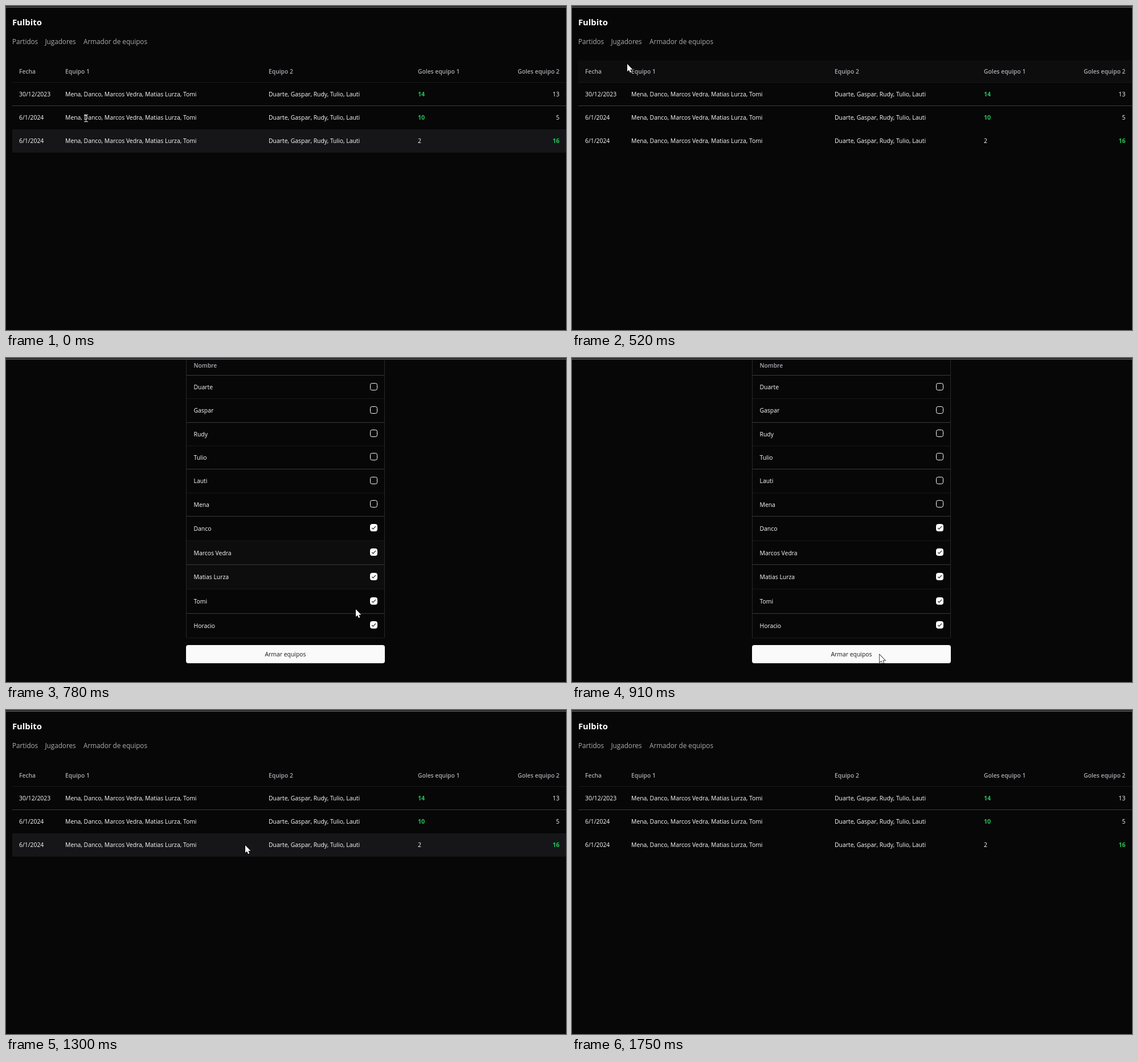
An HTML page with a canvas that plays this animation: 983 px wide and 570 px high, repeating every 1810 ms.

```html
<!DOCTYPE html>
<html lang="es">
<head>
<meta charset="utf-8">
<title>Fulbito</title>
<style>
  html, body { margin: 0; width: 100%; height: 100%; overflow: hidden; background: #070707; }
  canvas { display: block; }
</style>
</head>
<body>
<canvas id="stage" width="983" height="570"></canvas>
<script>
const ctx = document.getElementById('stage').getContext('2d');
const LOOP = 1810, STEP = 130, LAST_STEP = 1750;
const BG = '#070707', WHITE = '#ffffff', MUTED = '#acacb3', GREEN = '#22c55e';
const LINE = '#3a3a3d', FAINT = '#19191b';
const FAMILY = '"Open Sans", "Noto Sans", sans-serif';
const BODY = `500 10.4px ${FAMILY}`, HEAD = `600 10.3px ${FAMILY}`;
const STRONG = `700 10.6px ${FAMILY}`, NAV = `500 11.7px ${FAMILY}`, TITLE = `700 14.8px ${FAMILY}`;

const team1 = ['Mena', 'Danco', 'Marcos Vedra', 'Matias Lurza', 'Tomi'];
const team2 = ['Duarte', 'Gaspar', 'Rudy', 'Tulio', 'Lauti'];
const players = [...team2, ...team1, 'Horacio'];
const matches = [['30/12/2023', 14, 13], ['6/1/2024', 10, 5], ['6/1/2024', 2, 16]];

// Each pose holds for one step; "lit" maps a row (0 = table header) to its hover strength.
const poses = [
  { at: [141, 197], beam: true, lit: { 3: 1 } },
  { at: [133, 188], lit: { 2: 1 } },
  { at: [125, 178], lit: { 1: 1 } },
  { at: [111, 141], lit: { 1: 1 } },
  { at: [97, 102], lit: { 0: 0.4 } },
  { list: true, at: [645, 386], top: 38, checked: [6, 8], lit: { 8: 0.6 } },
  { list: true, at: [614, 442], top: 30.5, checked: [6, 10], lit: { 7: 0.35, 8: 0.35 } },
  { list: true, at: [540, 522], top: 30.5, checked: [6, 10], lit: {} },
  { at: [176, 232], lit: { 3: 1 } },
  { at: [232, 183], lit: { 2: 0.6, 3: 0.6 } },
  { at: [420, 238], lit: { 3: 1 } },
  { at: [620, 301], lit: { 3: 0.3 } },
  { at: [811, 161], lit: { 1: 0.85 } },
  { at: [964, 142], lit: { 1: 0.85 } },
  { lit: {} }
];

function rect(x, y, w, h, color) {
  ctx.fillStyle = color;
  ctx.fillRect(x, y, w, h);
}

function text(str, x, y, font, color = WHITE, align = 'left') {
  ctx.font = font;
  ctx.fillStyle = color;
  ctx.textAlign = align;
  ctx.fillText(str, x, y);
}

function highlight(x, y, w, h, strength) {
  if (strength) rect(x, y, w, h, `rgba(39, 39, 44, ${0.5 * strength})`);
}

function score(value, rival, x, y, align) {
  const won = value > rival;
  text(value, x, y, won ? STRONG : BODY, won ? GREEN : WHITE, align);
}

function drawMatches({ lit }) {
  text('Fulbito', 11, 34, TITLE);
  text('Partidos', 11, 67, NAV, MUTED);
  text('Jugadores', 68.5, 67, NAV, MUTED);
  text('Armador de equipos', 136, 67, NAV, MUTED);

  highlight(11, 96, 972, 39, lit[0]);
  text('Fecha', 23, 119, HEAD, MUTED);
  text('Equipo 1', 104, 119, HEAD, MUTED);
  text('Equipo 2', 461, 119, HEAD, MUTED);
  text('Goles equipo 1', 723, 119, HEAD, MUTED);
  text('Goles equipo 2', 971.5, 119, HEAD, MUTED, 'right');

  matches.forEach(([date, goals1, goals2], i) => {
    const top = Math.round(134.5 + i * 41.2), y = top + 24;
    highlight(11, top, 972, 41, lit[i + 1]);
    if (i < 2) rect(11, i ? 175 : 134, 972, 1, i ? LINE : FAINT);
    text(date, 23, y, BODY);
    text(team1.join(', '), 104, y, BODY);
    text(team2.join(', '), 461, y, BODY);
    score(goals1, goals2, 723, y, 'left');
    score(goals2, goals1, 971.5, y, 'right');
  });
}

function checkbox(y, checked) {
  ctx.beginPath();
  ctx.roundRect(639.5, y - 6, 12, 12, 3);
  ctx.lineWidth = 1;
  ctx.strokeStyle = WHITE;
  ctx.stroke();
  if (!checked) return;
  ctx.fillStyle = WHITE;
  ctx.fill();
  ctx.beginPath();
  ctx.moveTo(642.2, y + 0.3);
  ctx.lineTo(644.4, y + 2.5);
  ctx.lineTo(649, y - 2.4);
  ctx.strokeStyle = '#18181b';
  ctx.lineWidth = 1.1;
  ctx.stroke();
}

function drawPlayers({ top, checked: [first, last], lit }) {
  text('Nombre', 329.5, top - 14, HEAD, MUTED);
  let y = top;
  players.forEach((name, i) => {
    const checked = i >= first && i <= last;
    const height = checked ? 42.8 : 41.3, middle = y + height / 2;
    highlight(317, y, 347, height, lit[i]);
    rect(317, Math.floor(y), 347, 1, i % 2 ? FAINT : LINE);
    text(name, 329.5, Math.round(middle + 4), BODY);
    checkbox(Math.round(middle - 1.6) + 0.5, checked);
    y += height;
  });
  y = Math.round(y);
  rect(317, y, 347, 1, FAINT);
  const edge = Math.max(3, top - 40);
  for (const x of [316, 664]) rect(x, edge, 1, y - edge, '#29292b');

  ctx.beginPath();
  ctx.roundRect(316, y + 13, 349, 32, 4);
  ctx.fillStyle = '#fafafa';
  ctx.fill();
  text('Armar equipos', 490.5, y + 33, BODY, '#18181b', 'center');
}

function drawArrow(x, y) {
  const outline = [[0, 0], [0, 14], [3.2, 11], [5.3, 16], [7.7, 15], [5.6, 10.2], [10, 10.2]];
  ctx.beginPath();
  outline.forEach(([dx, dy]) => ctx.lineTo(x + dx * 0.95, y + dy * 0.95));
  ctx.closePath();
  ctx.lineWidth = 1.4;
  ctx.strokeStyle = '#000';
  ctx.stroke();
  ctx.fillStyle = '#fff';
  ctx.fill();
}

function drawBeam(x, y) {
  rect(x - 1, y - 6, 1, 13, '#ddd');
  for (const end of [-6, 6]) {
    rect(x - 4, y + end, 3, 1, '#ddd');
    rect(x, y + end, 3, 1, '#ddd');
  }
}

function draw(now) {
  const t = now % LOOP;
  const pose = poses[t >= LAST_STEP ? poses.length - 1 : Math.floor(t / STEP)];
  rect(0, 0, 983, 570, BG);
  (pose.list ? drawPlayers : drawMatches)(pose);
  rect(0, 0, 983, 2, '#29292b');
  rect(0, 2, 983, 1, '#5c5c5e');
  if (pose.at) (pose.beam ? drawBeam : drawArrow)(...pose.at);
}

const start = performance.now();
function tick() {
  draw(performance.now() - start);
  requestAnimationFrame(tick);
}
tick();
</script>
</body>
</html>
```
